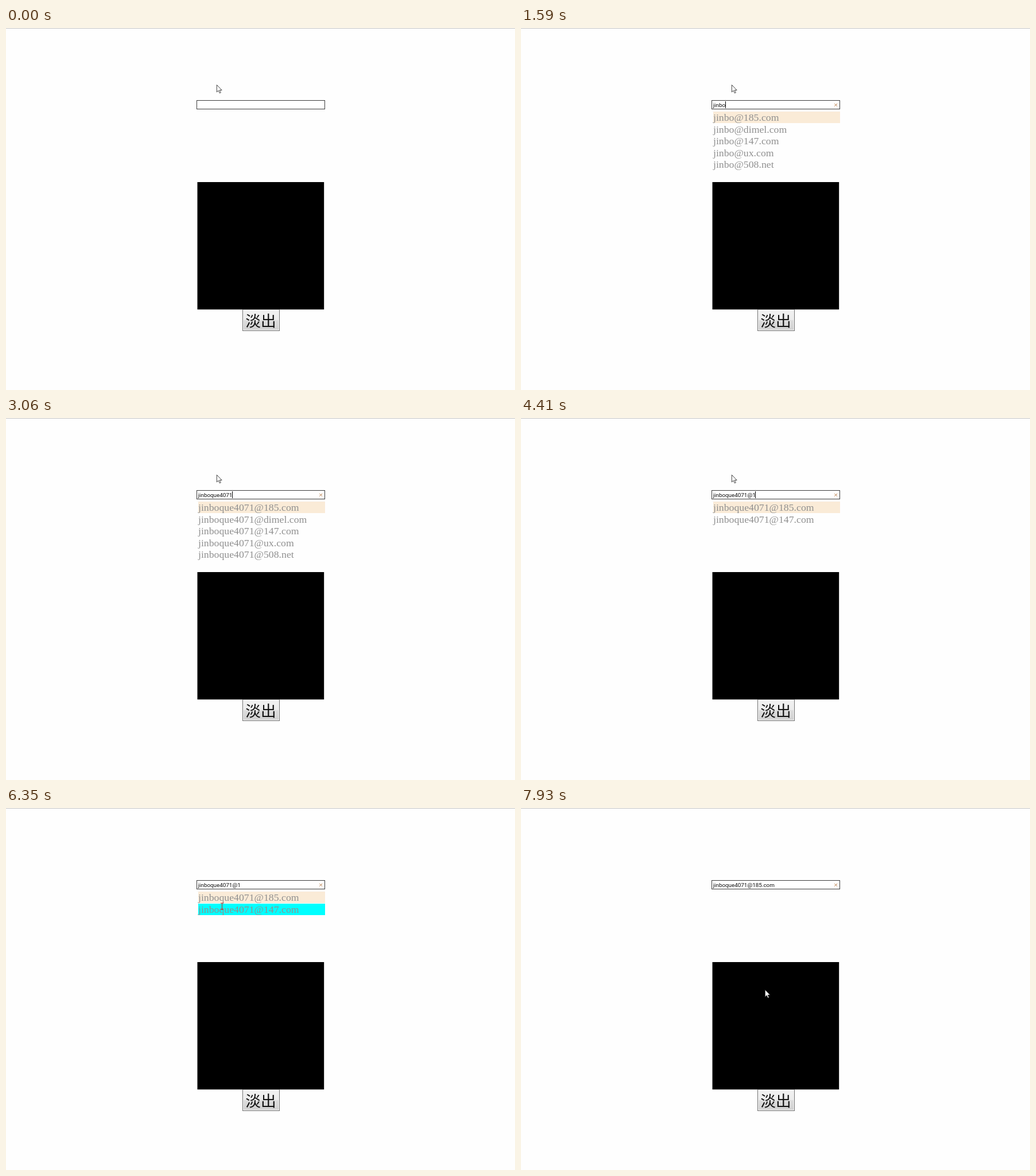
Animation of 887 by 632 pixels, one loop 8000 ms. Source, as an HTML page with a canvas:

```html
<!DOCTYPE html>
<html lang="zh-CN">
<head>
<meta charset="utf-8">
<title>Mail suggestions</title>
<style>
html, body { margin: 0; width: 100%; height: 100%; overflow: hidden; background: #fefefe; }
canvas { display: block; }
</style>
</head>
<body>
<canvas id="stage" width="887" height="632"></canvas>
<script>
const ctx = document.getElementById('stage').getContext('2d');
const LOOP = 8000;
const TICK = 120;
const FOCUS_TIME = 120;
const PICK_TIME = 7320;
const BLINK = 980;
const DOMAINS = ['185.com', 'dimel.com', '147.com', 'ux.com', '508.net'];
const ROW = { x: 335, y: 146, w: 221, h: 20.5 };

// Bursts of typing, one letter per tick
const BURSTS = [
  { at: 610, keys: 'j' }, { at: 980, keys: 'in' }, { at: 1470, keys: 'boq' },
  { at: 1960, keys: 'ue' }, { at: 2330, keys: '4' }, { at: 2700, keys: '07' },
  { at: 3060, keys: '1' }, { at: 3920, keys: '@' }, { at: 4410, keys: '1' }
];

// Pointer moves: each runs straight to its end in equal ticks
const HOME = { x: 367, y: 99 };
const MOVES = [
  { at: 5390, ticks: 6, x: 376, y: 161 },
  { at: 6230, ticks: 3, x: 376, y: 177 },
  { at: 6720, ticks: 2, x: 376, y: 160 },
  { at: 7690, ticks: 3, x: 425, y: 317 }
];

const clamp = (v, lo, hi) => Math.min(hi, Math.max(lo, v));
const ticksSince = (t, at) => Math.floor((t - at) / TICK) + 1;

function typing(t) {
  let value = '', lastKey = FOCUS_TIME;
  for (const { at, keys } of BURSTS) {
    const n = clamp(ticksSince(t, at), 0, keys.length);
    if (n) lastKey = at + (n - 1) * TICK;
    value += keys.slice(0, n);
  }
  if (t >= PICK_TIME) {
    value = value.split('@')[0] + '@' + DOMAINS[0];
    lastKey = PICK_TIME;
  }
  return { value, lastKey };
}

// The caret stays on after a key, fades out, then returns
function caretAlpha(t, lastKey) {
  if (t < FOCUS_TIME) return 0;
  const phase = (t - lastKey) % BLINK;
  return clamp((600 - phase) / 230, 0, 1);
}

function pointer(t) {
  let { x, y } = HOME;
  for (const move of MOVES) {
    const p = clamp(ticksSince(t, move.at) / move.ticks, 0, 1);
    x += (move.x - x) * p;
    y += (move.y - y) * p;
  }
  return { x, y };
}

function suggestions(value, t) {
  if (!value || t >= PICK_TIME) return [];
  const [user, typed = ''] = value.split('@');
  return DOMAINS.filter(d => d.startsWith(typed)).map(d => user + '@' + d);
}

function rect(color, x, y, w, h) {
  ctx.fillStyle = color;
  ctx.fillRect(x, y, w, h);
}

function text(str, x, y, font, color) {
  ctx.font = font;
  ctx.fillStyle = color;
  ctx.fillText(str, x, y);
}

function outline(color, x, y, w, h) {
  ctx.strokeStyle = color;
  ctx.lineWidth = 1;
  ctx.strokeRect(x + 0.5, y + 0.5, w - 1, h - 1);
}

function strokePath(path, color, width) {
  ctx.strokeStyle = color;
  ctx.lineWidth = width;
  ctx.stroke(path);
}

function drawPage() {
  rect('#fefefe', 0, 0, 887, 632);
  rect('#c4c4c4', 0, 0, 887, 1);
  rect('#000', 333.5, 269, 220.7, 222.4);

  const face = ctx.createLinearGradient(0, 491, 0, 529);
  face.addColorStop(0, '#f2f2f2');
  face.addColorStop(0.5, '#ebebeb');
  face.addColorStop(0.5, '#dddddd');
  face.addColorStop(1, '#cfcfcf');
  rect(face, 412, 491, 65, 38);
  outline('#f5f5f5', 413, 492, 63, 36);
  outline('#707070', 412, 491, 65, 38);
  ctx.textAlign = 'center';
  text('淡出', 444, 521.3, '300 26.7px "Noto Sans CJK SC", "Noto Sans CJK", sans-serif', '#111');
  ctx.textAlign = 'left';
}

function drawInput(value, alpha) {
  rect('#fff', 332, 126, 224, 16);
  outline('#3c3c3c', 332, 126, 224, 16);
  text(value, 334.7, 137.6, '9.85px Roboto, sans-serif', '#111');
  const end = Math.floor(334.7 + ctx.measureText(value).width);
  rect(`rgba(0, 0, 0, ${alpha})`, end, 128, 1, 12);
  if (value) strokePath(new Path2D('M546.3 132l4.7 4.7m0 -4.7l-4.7 4.7'), '#b5763f', 1);
}

function drawList(rows, hover) {
  rows.forEach((row, i) => {
    const y = ROW.y + i * ROW.h;
    const fill = i === hover ? '#00ffff' : i === 0 ? '#faebd7' : null;
    if (fill) rect(fill, ROW.x, Math.round(y), ROW.w, 20);
    text(row, ROW.x, y + 16, '17.75px "Liberation Serif", "Times New Roman", serif', '#909090');
  });
}

function drawArrow(x, y) {
  const shape = new Path2D('M0 0V12.6L2.9 9.9L5 14.4L6.9 13.5L4.9 9.2H8.8Z');
  ctx.save();
  ctx.translate(x + 0.3, y + 0.3);
  ctx.fillStyle = '#fff';
  ctx.fill(shape);
  strokePath(shape, '#222', 0.85);
  ctx.restore();
}

function drawBeam(x, y) {
  ctx.save();
  ctx.translate(x, y);
  strokePath(new Path2D('M0.5 -5V6M-2 -5.5H3M-2 5.5H3'), '#c8281e', 1);
  ctx.restore();
}

function draw(t) {
  const { value, lastKey } = typing(t);
  const { x, y } = pointer(t);
  const rows = suggestions(value, t);
  const hover = Math.floor((y - ROW.y) / ROW.h);

  drawPage();
  drawInput(value, caretAlpha(t, lastKey));
  drawList(rows, hover);
  (rows[hover] ? drawBeam : drawArrow)(x, y);
}

const start = performance.now();
function tick() {
  draw((performance.now() - start) % LOOP);
  requestAnimationFrame(tick);
}
tick();
</script>
</body>
</html>
```
